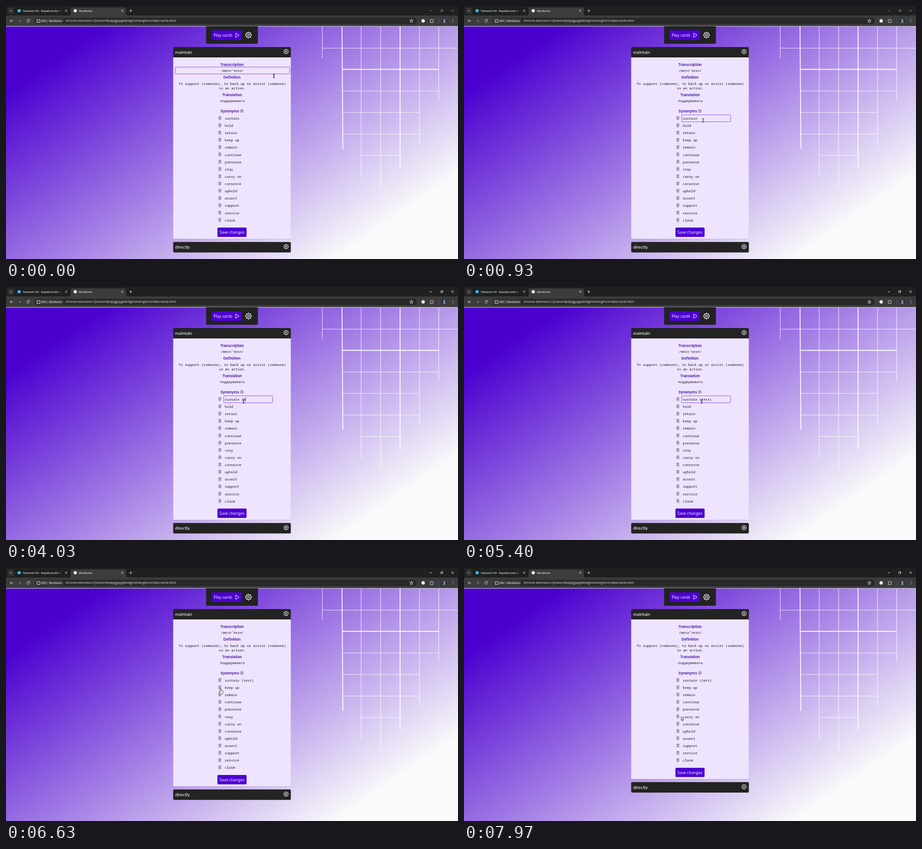
These frames come from a looping animation (999x561 px, 8000 ms). An HTML page:

```html
<!DOCTYPE html>
<html lang="en">
<head>
<meta charset="utf-8">
<title>Vocabulary cards</title>
<style>
  html, body { margin: 0; width: 100%; height: 100%; overflow: hidden; background: #202020; }
  svg { display: block; width: 999px; height: 561px; }
  text { white-space: pre; }
  .ui { font-family: "Open Sans", "Noto Sans", sans-serif; fill: #e6e6e6; }
  .tab { font-size: 5.95px; font-weight: 600; }
  .btn { font-size: 8.8px; fill: #fff; }
  .title { font: 400 10px Lato, sans-serif; fill: #fff; }
  .head { font: 600 8.1px Inter, sans-serif; fill: #3c0a9c; text-anchor: middle; }
  .mono { font: 400 7.62px "Noto Sans Mono", "DejaVu Sans Mono", monospace; fill: #17131f; }
  .mid { text-anchor: middle; }
  .line { fill: none; stroke: #e2e2e2; stroke-width: 1; stroke-linecap: round; stroke-linejoin: round; }
  .grid { fill: none; stroke: #fff; }
  .hover { fill: none; stroke: #8750e4; stroke-width: 1; }
  .trash { fill: none; stroke: #514a60; stroke-width: .75; stroke-linejoin: round; }
</style>
</head>
<body>
<svg viewBox="0 0 999 561">
  <defs>
    <linearGradient id="sky" gradientUnits="userSpaceOnUse" x1="69" y1="145.5" x2="477" y2="736.7">
      <stop stop-color="#4b00d0"/><stop offset="1" stop-color="#fafafa"/>
    </linearGradient>
    <linearGradient id="fade" gradientUnits="userSpaceOnUse" x1="112" y1="0" x2="125" y2="0">
      <stop stop-color="#e2e2e2"/><stop offset="1" stop-color="#e2e2e2" stop-opacity="0"/>
    </linearGradient>
    <path id="bin" class="trash" d="M469.4 246.2h6.4M471.4 246v-1.1h2.4v1.1M470.1 246.4l.4 5.5h4.2l.4-5.5M471.8 247.8v2.7M473.4 247.8v2.7"/>
    <g id="close">
      <circle r="4.7" fill="none" stroke="#fff" stroke-width="1.2"/>
      <path d="M-1.5-1.5l3 3M1.5-1.5l-3 3" stroke="#fff" stroke-width="1.3" stroke-linecap="round"/>
    </g>
    <path id="cross" class="line" d="M-1.9-1.9l3.8 3.8M1.9-1.9l-3.8 3.8"/>
    <path id="puzzle" class="line" d="M-3-2h2a1.1 1.1 0 0 1 2.2 0h2v2.1a1.1 1.1 0 0 1 0 2.1v1.8h-6.2v-1.8a1.1 1.1 0 0 0 0-2.1z"/>
  </defs>

  <!-- page -->
  <rect y="45" width="999" height="516" fill="url(#sky)"/>
  <g class="grid">
    <path stroke-width="1.1" stroke-opacity=".85" d="M699 45V116M785 45V379M828 45V406M914 45V304M956.5 45V208M699 93.5H999M743 188.5H957M744 236H914M744 284H914M785 331.5H871"/>
    <path stroke-width="1.8" d="M742.6 45L744.6 317M871 45V359M743 140.5H957"/>
  </g>

  <!-- browser -->
  <rect width="999" height="21" fill="#1f2020"/>
  <rect y="21" width="999" height="24" fill="#3c3c3c"/>
  <rect y="44.6" width="999" height="1" fill="#e4dff0"/>
  <path fill="#3c3c3c" d="M139 21q4 0 4-4V7q0-4 4-4h114q4 0 4 4v10q0 4 4 4z"/>
  <rect x="4" y="3.5" width="13.500" height="14" rx="4" fill="#333"/>
  <path class="line" d="M8.800 9.700l2 2 2-2"/>
  <circle cx="29" cy="10.500" r="3.600" fill="#38bdf8"/>
  <circle cx="153" cy="10.500" r="3.600" fill="#f2f2f2"/>
  <text class="ui tab" x="37" y="12.700" style="fill:url(#fade)">Tailwind CSS - Rapidly build m</text>
  <text class="ui tab" x="161" y="12.700">Wordlumo</text>
  <use href="#cross" x="133" y="10.500"/>
  <use href="#cross" x="257" y="10.500"/>
  <path class="line" d="M273.200 10.500h5M275.700 8v5"/>
  <g id="win" class="line">
    <path d="M936.800 10.500h4.400M984.800 8.300l4.400 4.400M989.200 8.300l-4.400 4.400"/>
    <path stroke-width=".8" d="M961 9.200h3.500v3.500h-3.500zM962 8.200h3.500v3.500"/>
  </g>
  <path class="line" d="M15 33H9.500M12 30.400L9.400 33l2.600 2.600"/>
  <path class="line" style="stroke:#858585" d="M27.500 33H33M30.500 30.400l2.600 2.600-2.600 2.600"/>
  <path class="line" d="M51.200 31.100a3 3 0 1 0 .7 2.600M51.800 29.800v1.900h-1.900"/>
  <rect x="63" y="26" width="845" height="14" rx="7" fill="#282828"/>
  <rect x="65" y="27.500" width="62" height="11" rx="5.500" fill="#3c3c3c"/>
  <use href="#puzzle" x="71.600" y="32.500"/>
  <text class="ui" x="78" y="35.100" style="font-size:5.700px;font-weight:600">DEV | Wordlumo</text>
  <text class="ui" x="131.500" y="35.300" style="font-size:6.980px">chrome-extension://joobomfpdpigjppgddobghoimknghicm/tabs/cards.html</text>
  <path class="line" stroke-width=".9" d="M896 29.300l1.100 2.500 2.700.2-2.100 1.800.7 2.700-2.400-1.400-2.400 1.400.7-2.700-2.100-1.800 2.700-.2z"/>
  <circle cx="922" cy="33" r="3.700" fill="#f2f2f2"/>
  <use href="#puzzle" x="940.800" y="32.600"/>
  <path d="M957 28v10" stroke="#5c5c5c" stroke-width=".8"/>
  <circle cx="968.800" cy="33" r="5" fill="#222a36"/>
  <path fill="#7993ad" d="M966 37.200q0-3.200 1.700-3.600a2.300 2.600 0 1 1 2.200 0q1.700.4 1.700 3.600z"/>
  <path class="line" stroke-width="1.700" d="M987.500 30v.01M987.500 33v.01M987.500 36v.01" style="stroke-width:1.600"/>

  <!-- toolbar -->
  <path fill="#222" d="M442.300 45h114.400v37q0 1.800-1.800 1.800H444.100q-1.800 0-1.800-1.800z"/>
  <rect x="454.500" y="54" width="67" height="21.300" rx="2" fill="#4c00d1"/>
  <text class="ui btn" x="459" y="68">Play cards</text>
  <path class="line" style="stroke:#fff" d="M508 60.200l7.300 4.500-7.300 4.500z"/>
  <path id="gear" class="line" style="stroke:#fff;stroke-width:1.200" transform="translate(536 64.500)"/>
  <circle cx="536" cy="64.500" r="2.200" class="line" style="stroke:#fff;stroke-width:1.200"/>

  <!-- open card -->
  <rect id="shade" x="369.500" y="110" width="260" height="407.400" rx="2.500" fill="#2a0a60" opacity=".16"/>
  <rect id="sheet" x="369.500" y="110" width="260" height="406.500" rx="2.500" fill="#eee4fe"/>
  <path fill="#232323" d="M369.500 114V93.500q0-2.500 2.500-2.500h255q2.500 0 2.500 2.500V114z"/>
  <text class="title" x="373.700" y="106">maintain</text>
  <use href="#close" x="619" y="101"/>
  <text class="head" x="499.500" y="132.600">Transcription</text>
  <text class="mono mid" x="500" y="145.800">/meɪnˈteɪn/</text>
  <text class="head" x="499.500" y="161.300">Definition</text>
  <text class="mono mid" x="500.300" y="174.500">To support (someone), to back up or assist (someone)</text>
  <text class="mono mid" x="500.300" y="184.500">in an action.</text>
  <text class="head" x="499.500" y="200">Translation</text>
  <text class="mono mid" x="500.500" y="213.200">поддерживать</text>
  <text class="head" x="494.500" y="235.800">Synonyms</text>
  <path fill="none" stroke="#4b3a75" stroke-width=".8" d="M517.900 232.700a3.400 3.400 0 1 1 6.800 0a3.400 3.400 0 1 1-6.800 0M519.500 232.700h3.600M521.300 230.900v3.600"/>
  <g id="hovers"></g>
  <g id="rows"></g>
  <rect id="caret" y="244.600" width=".9" height="9" fill="#17131f"/>
  <g id="below">
    <rect x="467.300" y="491.300" width="64.400" height="20.700" rx="2" fill="#4c00d1"/>
    <text class="ui btn" x="471.700" y="505.200">Save changes</text>
    <rect x="369.500" y="523.200" width="260" height="23.300" rx="2.500" fill="#232323"/>
    <text class="title" x="373.700" y="538.300">directly</text>
    <use href="#close" x="619" y="533.500"/>
  </g>

  <g id="pointer">
    <path id="beam" fill="none" stroke="#111" stroke-width=".9" d="M-2.200-3.900h1.500q.7 0 .7.700V3.200q0 .7-.7.700h-1.500M2.200-3.900H.7Q0-3.900 0-3.200V3.200q0 .7.700.7h1.500"/>
    <path id="arrow" fill="#fff" stroke="#111" stroke-width=".8" stroke-linejoin="round" d="M0 0v8l1.900-1.700 1.300 2.900 1.300-.6-1.300-2.800h2.500z"/>
    <path id="hand" fill="#fff" stroke="#111" stroke-width=".8" stroke-linejoin="round" d="M-1 1q0-1 1-1t1 1v3.400l3.500.8q1.100.3.900 1.500l-.6 3q-.2 1.200-1.100 1.900h-4.200q-1-.8-1.600-2l-1.700-2.800q-.2-1.200.9-.9l1.900 1.300z"/>
  </g>
</svg>
<script>
const $ = id => document.getElementById(id);
const LOOP = 8000, PITCH = 16.13, CHAR = 4.572, SLOTS = 8;
const words = ['sustain', 'hold', 'retain', 'keep up', 'remain', 'continue', 'preserve', 'stay',
  'carry on', 'conserve', 'uphold', 'assert', 'support', 'service', 'claim'];
const removed = { hold: 6170, retain: 6630, stay: 7800 };
const suffix = ' (test)';
const keys = [3170, 3630, 4030, 4270, 4430, 4570, 4870];

// pointer moves: start, end, x, y, sideways bow
const moves = [
  [30, 830, 537, 252, 0],
  [870, 930, 528.5, 253.5, 0],
  [2030, 2070, 525.3, 253.8, 0],
  [5400, 5930, 474.5, 267.5, 0],
  [6830, 7570, 473, 327, 24],
  [7800, 7970, 480, 330, 0]
];

// hoverable fields: x, y, width, height, extra hit height
const fields = [
  [374, 135.4, 253.3, 15.3, 5],
  [374, 163.6, 253.3, 25, 0],
  [374, 203, 253.3, 15.3, 0]
];
for (let i = 0; i < SLOTS; i++) fields.push([481.2, 241.3 + i * PITCH, 108, 15.4, 0]);

function add(parent, tag, attrs) {
  const el = document.createElementNS('http://www.w3.org/2000/svg', tag);
  for (const k in attrs) el.setAttribute(k, attrs[k]);
  return parent.appendChild(el);
}

const boxes = fields.map(([x, y, width, height]) =>
  add($('hovers'), 'rect', { class: 'hover', x, y, width, height, rx: 1.2 }));

const rows = words.map(word => {
  const g = add($('rows'), 'g', {});
  add(g, 'use', { href: '#bin' });
  const label = add(g, 'text', { class: 'mono', x: 483.6, y: 251.9 });
  label.textContent = word;
  return { g, label, word };
});

let cog = '';
for (let i = 0; i < 32; i++) {
  const r = i % 4 < 2 ? 6.6 : 5, a = (i - 0.5) * Math.PI / 16;
  cog += (i ? 'L' : 'M') + (r * Math.cos(a)).toFixed(2) + ' ' + (r * Math.sin(a)).toFixed(2);
}
$('gear').setAttribute('d', cog + 'z');

function pointerAt(t) {
  let x = 592, y = 155;
  for (const [from, to, tx, ty, bow] of moves) {
    if (t <= from) break;
    const p = Math.min(1, (t - from) / (to - from));
    const e = p * p * (3 - 2 * p);
    x += (tx - x) * e + bow * Math.sin(Math.PI * e);
    y += (ty - y) * e;
  }
  return [x, y];
}

const inside = ([x, y], [fx, fy, w, h, extra]) =>
  x >= fx && x <= fx + w && y >= fy && y <= fy + h + extra;

// border transition: share of the last 150 ms spent over the field
function glow(t, field) {
  let n = 0;
  for (let k = 0; k < 6; k++) n += inside(pointerAt(t - k * 25), field);
  return n / 6;
}

const show = (el, on) => { el.style.display = on ? '' : 'none'; };

function draw(t) {
  const at = pointerAt(t);
  const typed = keys.filter(k => t >= k).length;

  let slot = 0;
  for (const { g, word } of rows) {
    const live = !(t >= removed[word]);
    show(g, live);
    if (live) g.setAttribute('transform', `translate(0 ${((slot++ - 0) * PITCH).toFixed(2)})`);
  }
  rows[0].label.textContent = words[0] + suffix.slice(0, typed);

  const up = (words.length - slot) * PITCH;
  $('below').setAttribute('transform', `translate(0 ${-up})`);
  $('sheet').setAttribute('height', 406.5 - up);
  $('shade').setAttribute('height', 407.4 - up);

  boxes.forEach((box, i) => box.setAttribute('opacity', glow(t, fields[i])));

  show($('caret'), (t >= 1500 && t < 2030) || (t >= 2600 && t < 3130) || (t >= keys[0] && t < 5400));
  $('caret').setAttribute('x', 483.4 + (words[0].length + typed) * CHAR);
  $('win').setAttribute('opacity', t < 1500 ? 0.5 : 1);

  const text = fields.some(f => inside(at, f));
  const link = !text && at[0] < 479 && at[1] > 244;
  show($('beam'), text);
  show($('hand'), link);
  show($('arrow'), !text && !link);
  $('pointer').setAttribute('transform', `translate(${at[0].toFixed(2)} ${at[1].toFixed(2)})`);
}

const start = performance.now();
function tick() {
  draw((performance.now() - start) % LOOP);
  requestAnimationFrame(tick);
}
tick();
</script>
</body>
</html>
```
